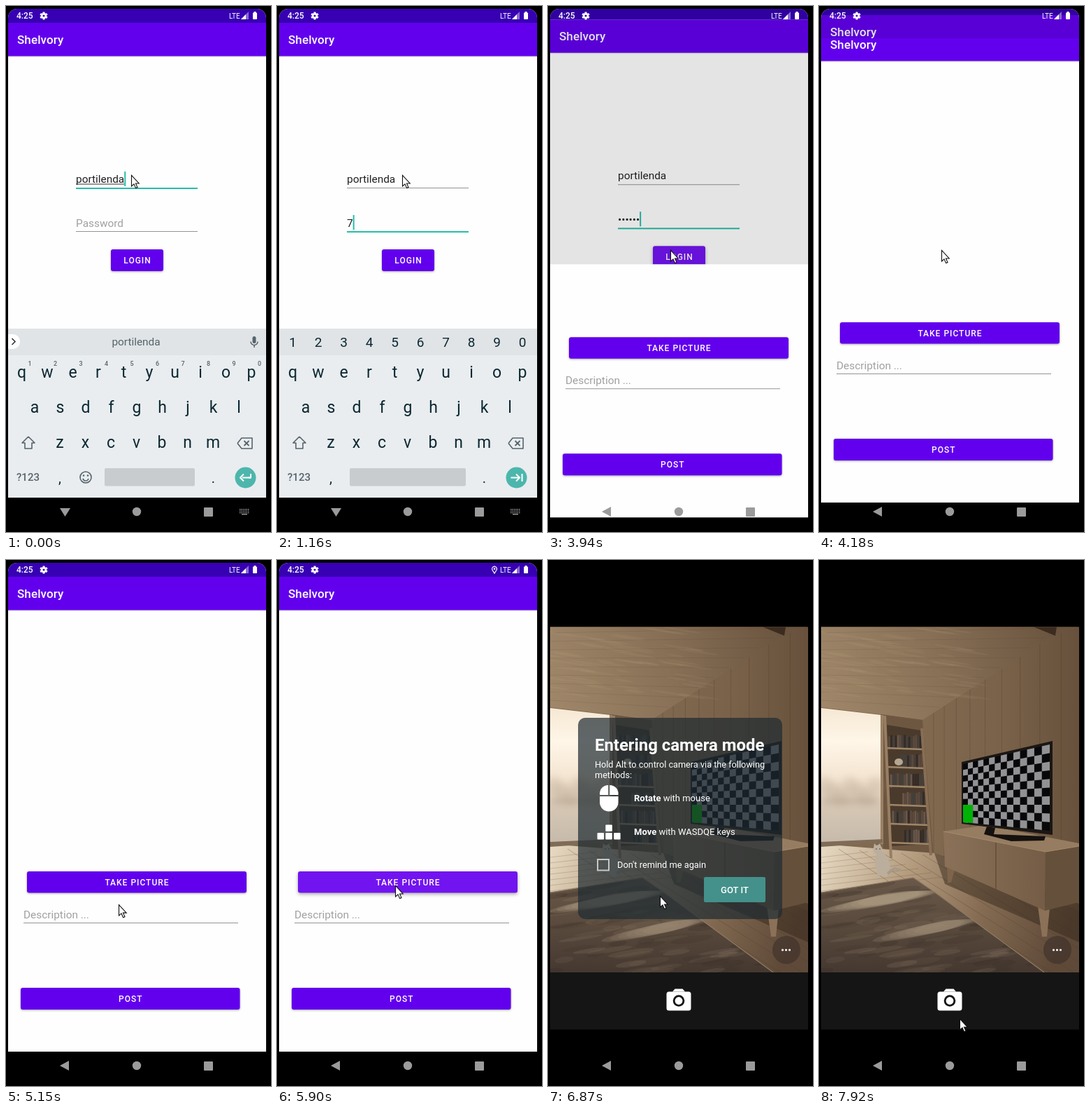
An HTML page with a canvas that plays this animation: 379 px wide and 750 px high, repeating every 8000 ms.

```html
<!DOCTYPE html>
<html lang="en">
<head>
<meta charset="utf-8">
<title>App login and camera</title>
<style>
html, body { margin: 0; width: 100%; height: 100%; overflow: hidden; background: #000; }
canvas { display: block; width: 379px; height: 750px; }
</style>
</head>
<body>
<canvas id="stage" width="379" height="750"></canvas>
<script>
const LOOP = 8000, CADENCE = 125;
const APP = 'Shelvory', USER = 'portilenda', PIN = '741952';
const PURPLE = '#6200ee', TEAL = '#27bda9', GREY = '#9b9b9b', SOFT = '#56646b', INK = '#0c2831';
const FOCUS = 430, TYPE = 1010, KEY_GAP = 183, MASK = 1500, BLINK = 500;
const LOGIN = 3270, SNAP = 5540, CAMERA = 6720, GOT_IT = 7380;

const stage = document.getElementById('stage');
let g = stage.getContext('2d');

/* ---- helpers ---- */
const mix = (a, b, k) => a + (b - a) * k;
const clamp = v => Math.max(0, Math.min(1, v));
const easeOut = p => 1 - (1 - p) ** 2;

function held(t, a, b) {
  const n = Math.round((b - a) / CADENCE);
  return clamp(Math.floor(n * (t - a) / (b - a) + 1e-6) / n);
}
function rect(color, x, y, w, h, r = 0) {
  g.fillStyle = color;
  g.beginPath();
  g.roundRect(x, y, w, h, r);
  g.fill();
}
function disc(color, x, y, rx, ry = rx, turn = 0) {
  g.fillStyle = color;
  g.beginPath();
  g.ellipse(x, y, rx, ry, turn, 0, 7);
  g.fill();
}
function arc(color, width, x, y, r, from = 0, to = 7) {
  g.strokeStyle = color;
  g.lineWidth = width;
  g.beginPath();
  g.arc(x, y, r, from, to);
  g.stroke();
}
function trace(pts) {
  g.beginPath();
  for (let i = 0; i < pts.length; i += 2) g.lineTo(pts[i], pts[i + 1]);
}
function poly(color, ...pts) {
  g.fillStyle = color;
  trace(pts);
  g.fill();
}
function line(color, width, ...pts) {
  g.strokeStyle = color;
  g.lineWidth = width;
  trace(pts);
  g.stroke();
}
function at(x, y, paint) {
  g.save();
  g.translate(x, y);
  paint();
  g.restore();
}
function text(s, x, y, size, color, { weight = 400, align = 'left', gap = 0 } = {}) {
  g.font = `${weight} ${size}px Roboto, sans-serif`;
  g.letterSpacing = gap + 'px';
  g.textAlign = align;
  g.fillStyle = color;
  g.fillText(s, x, y);
}
function blend(x0, y0, x1, y1, ...colors) {
  const grad = g.createLinearGradient(x0, y0, x1, y1);
  colors.forEach((c, i) => grad.addColorStop(i / (colors.length - 1), c));
  return grad;
}

/* ---- phone chrome ---- */
function statusIcons(located) {
  text('4:25', 15, 18, 12, '#fff', { weight: 500 });
  at(54, 14, () => {
    for (let i = 0; i < 6; i++) {
      g.rotate(Math.PI / 3);
      rect('#fff', -1.5, -5.6, 3, 4);
    }
    arc('#fff', 2.4, 0, 0, 3);
  });
  if (located) at(311, 12.6, () => {
    arc('#fff', 1.2, 0, 0, 3.4, 2.6, 6.8);
    line('#fff', 1.2, -3, 1.6, 0, 6.4, 3, 1.6);
    disc('#fff', 0, 0, 1.3);
  });
  text('LTE', 319, 18, 10, '#fff');
  poly('#8a6bd2', 336, 19, 347, 19, 347, 8);
  poly('#fff', 336, 19, 343, 19, 343, 12);
  rect('#fff', 353, 9.5, 6, 9.5, 1);
  rect('#fff', 354.5, 8, 3, 2);
}
function navBar(typing) {
  if (typing) {
    poly(GREY, 77, 716, 92, 716, 84.5, 728);
    for (let i = 0; i < 18; i++)
      rect(GREY, 334 + i % 6 * 2.4, 717 + Math.floor(i / 6) * 2.4, 1.4, 1.4);
    rect(GREY, 337, 724, 8, 1.4);
  } else poly(GREY, 77, 721, 90, 714, 90, 728);
  disc(GREY, 187, 721, 6.2);
  rect(GREY, 283, 715, 13, 13, 1);
}
function appBar() {
  rect('#fefefe', 3, 4, 369, 697);
  rect('rgba(0,0,0,.1)', 3, 71, 369, 2);
  rect(PURPLE, 3, 24, 369, 47.5);
  rect('#3700b3', 3, 4, 369, 20);
  text(APP, 16, 54, 17, '#fff', { weight: 500, gap: .1 });
}
function button(label, x, y, w, h, lit) {
  g.save();
  g.shadowColor = 'rgba(0,0,0,.35)';
  g.shadowBlur = lit ? 5 : 3;
  g.shadowOffsetY = lit ? 2 : 1;
  rect(lit ? '#7214f0' : PURPLE, x, y, w, h, 3);
  g.restore();
  text(label, x + w / 2 + .5, y + 20, 12, '#fff', { weight: 500, align: 'center', gap: 1 });
}
function field(x, w, y, focused) {
  focused ? rect(TEAL, x, y, w, 2) : rect('#949494', x, y, w, 1);
}

/* ---- login ---- */
function keyboard(secret) {
  const row = (keys, x, y, size, style = {}) => [...keys].forEach((k, i) =>
    text(k, x + i * 36.5, y, size, style.color || INK, { align: 'center', ...style }));
  const digits = '1234567890';
  rect('#e9edf0', 3, 460, 369, 241);
  rect('#e0e4e7', 3, 460, 369, 38);
  if (secret) row(digits, 22.5, 486, 19);
  else {
    text(USER, 186, 484, 15.4, SOFT, { align: 'center' });
    rect('#fff', 3, 468, 17, 21, [0, 10, 10, 0]);
    line('#333', 1.6, 8.5, 474, 13, 478.5, 8.5, 483);
    rect(SOFT, 352.5, 471, 5, 10, 2.5);
    arc(SOFT, 1.5, 355, 478.5, 5, 0, Math.PI);
    rect(SOFT, 354.3, 483, 1.5, 4);
    row(digits, 34, 513, 9, { color: SOFT, weight: 500 });
  }
  row('qwertyuiop', 22.5, 530, 23);
  row('asdfghjkl', 41, 580, 23);
  row('zxcvbnm', 77, 630, 23);
  g.lineJoin = 'round';
  at(32, 614, () => line(SOFT, 1.6, 0, 0, 9, 9, 5, 9, 5, 17, -5, 17, -5, 9, -9, 9, 0, 0));
  at(344, 623.5, () => {
    line(SOFT, 1.6, -13, 0, -7, -7.5, 8, -7.5, 8, 7.5, -7, 7.5, -13, 0);
    line(SOFT, 1.8, -3.5, -3.5, 3.5, 3.5);
    line(SOFT, 1.8, 3.5, -3.5, -3.5, 3.5);
  });
  text('?123', 31.5, 677, 15, SOFT, { weight: 500, align: 'center' });
  text(',', 77, 680, 20, INK, { align: 'center' });
  text('.', 296.5, 680, 20, INK, { align: 'center' });
  const left = secret ? 104 : 141;
  rect('#c8cccf', left, 659, 270 - left, 25.5, 2);
  if (!secret) at(114, 672, () => {
    arc(SOFT, 1.6, 0, 0, 8);
    arc(SOFT, 1.6, 0, 1, 4, .2, 2.95);
    disc(SOFT, -3, -2.5, 1.3);
    disc(SOFT, 3, -2.5, 1.3);
  });
  disc('#4db6ac', 342.5, 672.5, 15);
  at(342.5, 672.5, () => {
    const d = secret ? 1 : -1;
    line('#fff', 2, -8 * d, 0, 4.5 * d, 0);
    at(secret ? 4.5 : -7.5, 0, () => line('#fff', 2, -5 * d, -5, 0, 0, -5 * d, 5));
    secret ? line('#fff', 2, 8, -5.5, 8, 5.5) : line('#fff', 2, 4, 0, 7.5, 0, 7.5, -5.5);
  });
}
function login(t) {
  const secret = t >= FOCUS;
  const count = Math.max(0, Math.min(PIN.length, 1 + Math.floor((t - TYPE) / KEY_GAP)));
  const lastKey = count ? TYPE + (count - 1) * KEY_GAP : FOCUS;
  const tail = t - lastKey < MASK ? PIN[count - 1] : '•';
  const typed = count ? '•'.repeat(count - 1) + tail : '';

  appBar();
  text(USER, 100, 252, 15.4, '#212121');
  const userEnd = 100 + g.measureText(USER).width;
  if (!secret) {
    rect('#333', 100, 253.5, userEnd - 100, 1);
    rect(TEAL, userEnd, 236, 2, 21);
  }
  field(100, 174, 259, !secret);
  text(typed || 'Password', 100, 315, 15.4, typed ? '#212121' : '#a0a0a0');
  if (secret && (t - lastKey) % (2 * BLINK) < BLINK)
    rect(TEAL, 100 + g.measureText(typed).width, 298, 2, 21);
  field(100, 174, 321, secret);
  button('LOGIN', 150, 347, 75, 31, t >= LOGIN);
  keyboard(secret);
}

/* ---- new post ---- */
function post(t) {
  appBar();
  button('TAKE PICTURE', 30, 444, 314, 30.5, t >= SNAP);
  text('Description ...', 25, 511, 15.4, '#a0a0a0');
  field(25, 307, 517, false);
  button('POST', 21, 610, 313.5, 31);
}

/* ---- camera ---- */
function cameraIcon(x, y, s, color, hole) {
  at(x, y, () => {
    g.scale(s, s);
    rect(color, -17.5, -12, 35, 27, 3.5);
    poly(color, -9, -12, -5.5, -16, 5.5, -16, 9, -12);
    disc(hole, 0, 1, 8.3);
    disc(color, 0, 1, 5.4);
  });
}
function splash() {
  rect('#1c1c1c', 3, 4, 369, 697);
  cameraIcon(187, 345, 1.32, '#55595b', '#1c1c1c');
}
function paintWalls(rnd) {
  rect(blend(150, 0, 372, 0, '#80694f', '#7a624a', '#67513c'), 3, 95, 369, 493);
  for (let i = 0; i < 10; i++) {
    const x = 164 + i * (14 + i * 1.1);
    line('rgba(45,30,18,.18)', 1, x, 95, x, 450);
  }
  poly(blend(3, 210, 340, 95, '#a0876a', '#877056', '#6a543f'),
    3, 95, 372, 95, 335, 108, 148, 228, 88, 220, 3, 210);
  for (let i = 0; i < 9; i++)
    line('rgba(60,42,26,.1)', 1, 3, 104 + i * 12, mix(345, 150, i / 9), mix(97, 224, i / 9));
  for (let i = 0; i < 60; i++)
    disc('rgba(200,172,138,.08)', rnd() * 220, 100 + rnd() * 95, 10 + rnd() * 25, 1.5, .15);
  poly('#3c2c20', 306, 95, 340, 95, 338, 108);
  poly('#6e5740', 88, 220, 148, 228, 164, 425, 92, 425);
}
function paintFloor(rnd) {
  poly(blend(3, 420, 340, 560, '#e6d8c1', '#b59d80', '#846b52', '#5f4a39'),
    3, 405, 165, 418, 372, 500, 372, 588, 3, 588);
  for (let i = 0; i < 7; i++) {
    line('rgba(90,68,46,.22)', 1, 3, 424 + i * 8, 70 + i * 18, 416 + i * 6);
    line('rgba(80,58,38,.3)', 1, 28 + i * 30, 412 + i * 2, 300 + i * 32, 588);
  }
  poly('rgba(55,40,28,.5)', 165, 418, 372, 490, 372, 545, 180, 462);

  const rug = [3, 474, 135, 453, 166, 474, 322, 588, 3, 588];
  g.save();
  trace(rug);
  g.clip();
  rect(blend(0, 453, 0, 588, '#6a594a', '#594a3d', '#453830'), 3, 450, 369, 140);
  for (let i = 0; i < 100; i++) {
    g.globalAlpha = .08 + rnd() * .14;
    disc(i % 2 ? '#93806c' : '#30271f', rnd() * 320, 460 + rnd() * 128, 12 + rnd() * 22, 2 + rnd() * 3, -.15);
  }
  g.globalAlpha = .22;
  for (let i = 0; i < 6; i++) {
    disc('#b5a28a', 85 + i * 3, 487 - i, 85 - i * 8, 7, -.17);
    disc('#a08d77', 150 + i * 4, 528 - i, 75 - i * 8, 7, -.2);
  }
  g.restore();
  line('#8f7a61', 1.2, ...rug.slice(0, 8));
}
function paintWindow() {
  poly(blend(0, 210, 0, 402, '#f5e7d3', '#fff6e8', '#f5e6d3', '#d6c7b4', '#c6baab'),
    3, 211, 89, 221, 89, 399, 3, 403);
  g.save();
  g.filter = 'blur(5px)';
  for (let i = 0; i < 7; i++) disc('rgba(190,168,146,.3)', 8 + i * 12, 322 + i % 3 * 8, 11, 13);
  rect('rgba(160,142,124,.4)', 5, 340, 80, 8);
  g.restore();
  rect('#9a8165', 88, 221, 4, 184);
  poly('#7f6b56', 3, 402, 91, 398, 91, 403, 3, 409);
}
function paintShelf(rnd) {
  const books = ['#352b26', '#5b4a3d', '#44403c', '#69574a'];
  poly('#4a3a2c', 97, 235, 146, 243, 158, 405, 103, 408);
  for (let i = 0; i < 6; i++) {
    const y = 268 + i * 27, l = 95 + i * 1.4, r = 149 + i * 2;
    for (let x = l + (i % 2 ? 20 : 4); x < r - 4; x += 3.2)
      rect(books[Math.floor(rnd() * 4)], x, y - 16 - rnd() * 3, 2.7, 19);
    line('#a08668', 2.5, l, y, r, y + 2);
  }
  disc('#b8a790', 114, 288, 6, 5);
  line('#987e62', 4, 94, 222, 103, 425);
  line('#876e54', 4, 147, 240, 160, 421);
}
function paintCat() {
  const fur = '#bcae9d';
  disc(fur, 91, 434, 10, 18, -.25);
  disc(fur, 84, 413, 6.5);
  poly(fur, 78, 412, 79, 404, 83, 408, 87, 404, 90, 412);
  line(fur, 4, 84, 425, 85, 452);
  line('#a89a89', 4, 98, 447, 108, 440, 117, 442);
  disc('#6e6255', 82, 412, .9);
  disc('#6e6255', 87, 412, .9);
}
function paintCabinet() {
  poly('#7d644b', 183, 438, 194, 442, 189, 460, 184, 460);
  poly('#8a7157', 313, 494, 330, 496, 326, 537, 319, 537);
  poly('#967c60', 178, 387, 238, 378, 372, 404, 372, 409, 324, 416);
  poly(blend(178, 0, 324, 0, '#8a7158', '#745c46'), 178, 387, 324, 416, 323, 500, 180, 437);
  poly('#65503c', 324, 416, 372, 408, 372, 488, 323, 500);
  line('#a58b6d', 1, 178, 387, 324, 416, 372, 408);
  line('#55412f', 1, 253, 403, 253, 469);
}
function paintTelevision() {
  const cols = 14, rows = 10;
  poly('#15110f', 240, 380, 252, 382, 250, 391, 324, 394, 322, 400, 275, 401, 236, 391);
  poly('#1c1714', 204, 288, 334, 258, 334, 392, 204, 376);
  const corner = (c, r) => {
    const u = c / cols, k = u / (u + (1 - u) * 1.3);
    return [206 + 124 * k, mix(mix(291, 263, k), mix(374, 386, k), r / rows)];
  };
  const patch = (color, c, r, w, h) =>
    poly(color, ...corner(c, r), ...corner(c + w, r), ...corner(c + w, r + h), ...corner(c, r + h));
  patch('#08080a', 0, 0, cols, rows);
  for (let i = 0; i < cols * rows; i++) {
    const c = i % cols, r = Math.floor(i / cols);
    if ((c + r) % 2) patch('#929294', c, r, 1, 1);
  }
  patch('#00b106', 0, 7, 2, 3);
}
function paintRoom() {
  const picture = document.createElement('canvas'), main = g;
  let seed = 11;
  const rnd = () => (seed = seed * 16807 % 2147483647) / 2147483647;
  picture.width = 379;
  picture.height = 750;
  g = picture.getContext('2d');
  g.beginPath();
  g.rect(3, 95.5, 369, 492.5);
  g.clip();
  for (const paint of [paintWalls, paintFloor, paintWindow, paintShelf, paintCat, paintCabinet, paintTelevision])
    paint(rnd);
  g = main;
  return picture;
}
const room = paintRoom();

function viewfinder(t) {
  rect('#000', 0, 0, 379, 750);
  if (t >= CAMERA + 150) {
    g.drawImage(room, 0, 0);
    disc('rgba(60,48,40,.6)', 341, 556, 20);
    for (let i = -1; i < 2; i++) disc('#fff', 340.5 + i * 5, 556, 1.6);
  }
  rect('#151515', 3, 588, 369, 81.5);
  cameraIcon(187, 627.5, 1, '#fff', '#151515');
}
function dialog(alpha, lit) {
  const w = '#fff';
  const pair = (bold, rest, y) => {
    text(bold, 123, y, 13, w, { weight: 700 });
    text(rest, 123 + g.measureText(bold).width, y, 13, w);
  };
  g.save();
  g.globalAlpha = alpha * .7;
  rect('#1f2c32', 43, 225, 292, 287, 10);
  g.globalAlpha = alpha;
  text('Entering camera mode', 67, 272, 23.9, w, { weight: 700 });
  text('Hold Alt to control camera via the following', 67, 296, 12.7, w);
  text('methods:', 67, 311, 12.7, w);
  pair('Rotate', ' with mouse', 344);
  pair('Move', ' with WASDQE keys', 392);
  rect(w, 74, 321, 12.2, 14, [12, 0, 0, 0]);
  rect(w, 88.2, 321, 12.3, 14, [0, 12, 0, 0]);
  rect(w, 74, 337, 26.5, 21.5, [0, 0, 13, 13]);
  rect(w, 82.3, 377.5, 9.5, 9.5, 1);
  for (let i = 0; i < 3; i++) rect(w, 70.5 + i * 11.8, 389, 9.5, 9.5, 1);
  g.strokeStyle = '#c4c8c9';
  g.lineWidth = 2;
  g.strokeRect(71, 427, 16, 15.5);
  text("Don't remind me again", 99, 439, 12.8, w);
  rect(lit ? '#55a39b' : '#43918a', 223, 452, 88, 36, 2);
  text('GOT IT', 267, 475, 13, w, { weight: 500, align: 'center' });
  g.restore();
}

/* ---- composition ---- */
// The next screen slides up, revealed from below, while the old one rises.
function swap(old, next, p) {
  if (p === 0) return old();
  if (p === 1) return next();
  const rest = 1 - p;
  at(0, -13 * easeOut(p), old);
  rect('rgba(0,0,0,.1)', 3, 4, 369, 704);
  g.save();
  g.beginPath();
  g.rect(3, 719 * rest ** 3, 369, 750);
  g.clip();
  rect('#000', 3, 701, 369, 49);
  at(0, 44 * rest ** 2, next);
  g.restore();
}
function screen(t) {
  if (t >= CAMERA) return viewfinder(t);
  const form = () => post(t);
  if (t < 5000) swap(() => login(t), form, held(t, 3820, 4420));
  else swap(form, splash, held(t, 5930, 6430));
  if (t < 6570) statusIcons(t >= 5660);
  else rect('#000', 3, 690, 369, 60);
}
// Pointer strokes: start, end, bend point, resting point.
const STROKES = [
  [2520, 3120, 340, 320, 195, 360],
  [3270, 3540, 253, 392, 175, 348],
  [4180, 4870, 220, 465, 160, 504],
  [5020, 5390, 160, 485, 169, 464],
  [6050, 6550, 165, 470, 160, 479],
  [6870, 7380, 215, 480, 268, 471],
  [7400, 7920, 270, 530, 201, 654]];
function pointer(t) {
  let x = 179, y = 241;
  for (const [a, b, bx, by, ex, ey] of STROKES) {
    const p = held(t, a, b);
    x = mix(mix(x, bx, p), mix(bx, ex, p), p);
    y = mix(mix(y, by, p), mix(by, ey, p), p);
  }
  at(x, y, () => {
    g.lineJoin = 'miter';
    trace([.5, .5, .5, 16, 4, 12.8, 6.6, 18.6, 9, 17.6, 6.5, 12, 11.2, 12]);
    g.closePath();
    g.fillStyle = '#fff';
    g.strokeStyle = '#111';
    g.lineWidth = 1.1;
    g.fill();
    g.stroke();
  });
}
function draw(t) {
  rect('#000', 0, 0, 379, 750);
  g.save();
  g.beginPath();
  g.roundRect(3, 4, 369, 746, [13, 13, 0, 0]);
  g.clip();
  screen(t);
  g.restore();
  navBar(t < 3940);
  const fade = easeOut(held(t, 6270, 6870)) * (1 - held(t, 7410, 7770));
  if (fade) dialog(fade, t >= GOT_IT);
  pointer(t);
}
const start = performance.now();
(function tick() {
  draw((performance.now() - start) % LOOP);
  requestAnimationFrame(tick);
})();
</script>
</body>
</html>
```
